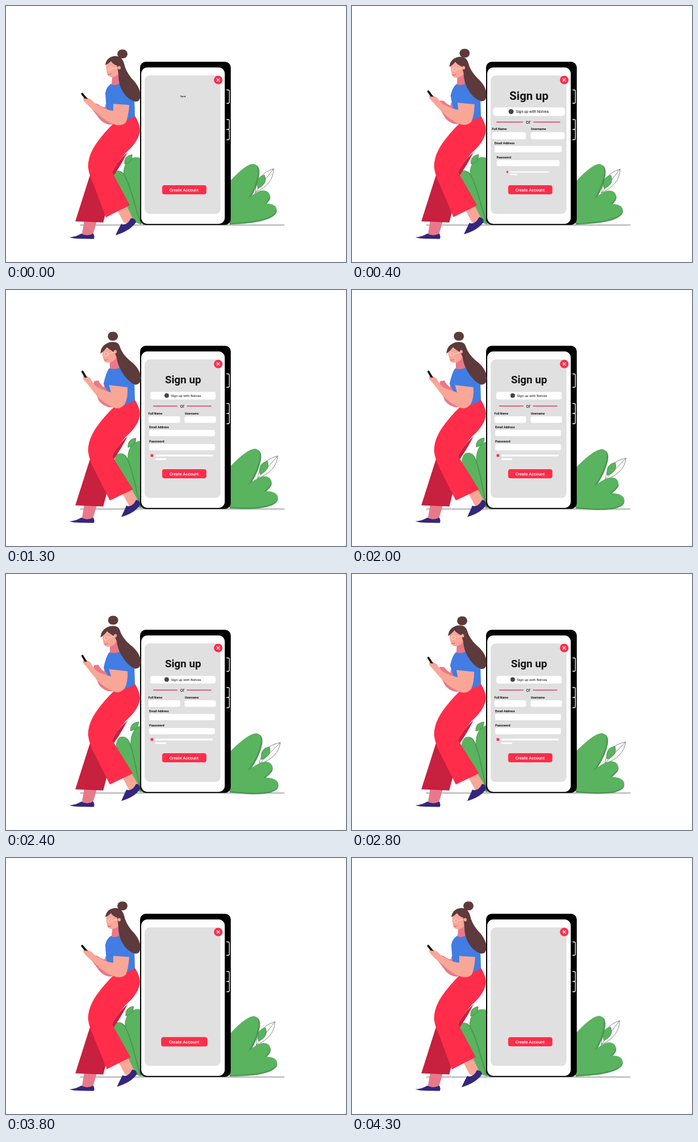
Animation of 596x450 px, one loop 4400 ms. Source, as an HTML page:

```html
<!DOCTYPE html>
<html lang="en">
<head>
<meta charset="utf-8">
<title>Sign up</title>
<style>
  html, body { margin: 0; width: 100%; height: 100%; overflow: hidden; background: #fff; }
  svg { display: block; width: 100vw; height: 100vh; }
  text { font-family: Roboto, sans-serif; fill: #111; }
  .label { font-size: 5.35px; font-weight: 700; }
  .red { fill: #ff2d4a; }
  .dark-red { fill: #c8203f; }
  .white { fill: #fff; }
  .skin { fill: #f9a697; }
  .skin-shade { fill: #e8798a; }
  .shoe { fill: #33267d; }
  .shirt { fill: #417de2; }
  .hair { fill: #5d3a3c; }
  .leaf { fill: #5ab35f; }
  .shade { fill: #4a9652; }
  .line { fill: none; stroke-linecap: round; stroke-linejoin: round; }
</style>
</head>
<body>
<svg viewBox="0 0 596 450">
  <defs>
    <path id="l1" d="M240 384 C222 360 205 320 206 290 C208 272 220 265 230 266 C245 268 250 300 250 330Z"/>
    <path id="l2" d="M238 384 C210 375 186 335 187 305 C188 288 198 286 206 294 C218 310 226 350 238 384Z"/>
    <path id="r1" d="M392 384 L392 313 C408 295 425 279 436 279 C444 280 446 290 443 302 C438 325 425 350 392 384Z"/>
    <path id="r2" d="M392 384 C405 360 430 332 448 327 C460 325 466 333 462 341 C450 360 420 376 392 384Z"/>
    <path id="r3" d="M392 384 C405 365 440 350 458 350 C472 350 478 358 473 365 C462 380 420 383 392 384Z"/>
  </defs>

  <!-- plants -->
  <path d="M130 385H488" stroke="#666"/>
  <g data-sway="8" data-c="238 384">
    <use href="#l1" class="shade"/><use href="#l1" class="leaf" x="1"/>
  </g>
  <g data-sway="5.4" data-c="238 384">
    <use href="#l2" class="shade"/><use href="#l2" class="leaf" x="-2"/>
    <path d="M208 278 Q206 264 221 261 Q222 275 208 278Z" class="leaf" stroke="#3d8a49" stroke-width=".8"/>
  </g>
  <g data-sway="7.3" data-c="394 384" stroke="#555" stroke-width=".7" class="line">
    <path d="M437 328 Q438 296 469 286 Q469 313 437 328 L469 286"/>
  </g>
  <g data-sway="3.3" data-c="394 384">
    <use href="#r1" class="shade"/><use href="#r1" class="leaf" x="-2.5" y="-1.5"/>
  </g>
  <g data-sway="6" data-c="394 384">
    <path d="M441.5 321 Q436 302 453 297 Q460 312 441.5 321Z" class="leaf" stroke="#3d8a49" stroke-width=".8"/>
  </g>
  <g data-sway="5.6" data-c="394 384">
    <use href="#r2" class="shade"/><use href="#r2" class="leaf" x="-1" y="-2.5"/>
  </g>
  <g data-sway="9.5" data-c="394 384">
    <use href="#r3" class="shade"/><use href="#r3" class="leaf" x="-.5" y="-2.5"/>
  </g>

  <!-- phone -->
  <rect x="235" y="98" width="159" height="286.8" rx="10"/>
  <rect x="237" y="108" width="146.5" height="275" rx="11" class="white"/>
  <rect x="243" y="122" width="133" height="243.6" rx="9" fill="#e0e0e0"/>
  <g class="line" stroke="#fff" stroke-width="1.3" transform="translate(.5)">
    <path d="M386.5 147.5H389Q391 147.5 391 149.5V169Q391 171 389 171H386.5"/>
    <path d="M386.5 199.5H389Q391 199.5 391 201.5V215Q391 217 389 217H386.5M389 217Q391 217 391 219V233Q391 235 389 235H386.5"/>
  </g>
  <circle cx="372" cy="130" r="7.6" class="red"/>
  <path d="M369.8 127.8l4.4 4.4m0 -4.4l-4.4 4.4" class="line" stroke="#fff" stroke-width="1.3"/>

  <!-- form -->
  <g data-in="-20" data-c="310.5 159">
    <text x="310.3" y="164.3" font-size="18.7" font-weight="700" text-anchor="middle">Sign up</text>
  </g>
  <g data-in="40" data-c="310 185.5">
    <rect x="253" y="179" width="114.5" height="13.5" rx="4" class="white"/>
    <circle cx="281.7" cy="185.6" r="4" fill="#444"/>
    <text x="289.3" y="187.7" font-size="6">Sign up with Nolvea</text>
  </g>
  <g data-in="80" data-c="309 204">
    <path d="M258 204H300.5M317 204H360" stroke="#e23a58" stroke-width="1.3"/>
    <text x="309" y="206.6" font-size="8.4" text-anchor="middle">or</text>
  </g>
  <g data-in="120" data-c="309 224">
    <text x="249.6" y="218.6" class="label">Full Name</text>
    <text x="313.4" y="218.6" class="label">Username</text>
    <rect x="249.7" y="222" width="55.5" height="11.5" rx="3" class="white"/>
    <rect x="313" y="222" width="55" height="11.5" rx="3" class="white"/>
  </g>
  <g data-in="165" data-c="308.5 248">
    <text x="251" y="243" class="label">Email Address</text>
    <rect x="251" y="246" width="115.3" height="11" rx="3" class="white"/>
  </g>
  <g data-in="200" data-c="308.5 273">
    <text x="251" y="267.8" class="label">Paassword</text>
    <rect x="251" y="270.8" width="115.3" height="11" rx="3" class="white"/>
  </g>
  <g data-in="285" data-c="308 293.5">
    <rect x="253.5" y="288.6" width="4.6" height="4.6" class="red"/>
    <rect x="262" y="289.6" width="100.6" height="2.8" rx="1" class="white"/>
    <rect x="262" y="296" width="19" height="2.8" rx="1" class="white"/>
  </g>
  <g id="button" data-c="312.5 323">
    <rect x="273.7" y="315" width="77.6" height="16" rx="4" class="red"/>
    <text x="312" y="325.5" font-size="7.35" font-weight="500" text-anchor="middle" style="fill:#fff">Create Account</text>
  </g>

  <!-- woman: "a~b" coordinates run from the upright pose to the leaning one -->
  <path d="M137 378 L159 379 L152 403 Q142 406 133 402Z" class="skin-shade"/>
  <path d="M111 406.5 Q124 405.5 132 400 Q142 406 153 400 Q156 405 154 409.5 L130 409 Q118 409 111 406.5Z" class="shoe"/>
  <path d="M147 298 L121.5 378.5 L170.5 380.5 L186 320 L175 296Z" class="dark-red"/>
  <path d="M184 296 Q192 276 213 257 Q202 279 188 299Z" class="dark-red"/>
  <g data-pose="foot">
    <path d="M196~205 361~359 L212~220 352~350 L223~232 375~371 Q216~225 386~382 206~216 380~380Z" class="skin"/>
    <path d="M192~202 403~399 Q198~208 390~386 202~211 383~379 Q212~221 387~383 219~228 373~369 Q227~235 373~369 228~235 380~378 Q218~226 395~392 192~202 403~399Z" class="shoe"/>
    <path d="M190 205 Q172 222 158 242 Q143 264 144 284 Q146 299 153 312 L175~182 371.5~370 L217~222.5 350~350.5 L186 292 Q192 279 210 258 Q233 238 235 218 Q234 206 226 193Z" class="red"/>
  </g>
  <g data-pose="body">
    <path d="M175~172 172~165 L188~184 182~180 L190~188 207~206 Q178~174 212~208 165~163 200~195 L147~152 176~168 L152~155 170~160 L160~162 172~159 Q168~166 178~167 173~172 178~171Z" class="skin-shade"/>
    <path d="M184~180.5 137~138 Q176~175 142~146 174~171 153~165 L176~178 180~178 L190 207 Q210 203 226 194 L225 160 Q218 138 201 134Z" class="shirt"/>
    <path d="M188~180.5 172~167 L216~213 174~171 Q215~214 193~190 210~208 205~201 Q203~201 211~209 193~193 209~208 Q176~176 205~203 158~160 187~187 Q146~148 177~172 141~141 172~163 L136~135 166~156 Q134~134 160~150 140~139 160~150 L150~148 165~155 Q158~154 174~167 164~160 176~171 Q176~172 183~177 188~184 184~180Z" class="skin"/>
    <path d="M133.5~134 154.5~143.5 L141~140.5 163.5~154.5" class="line" stroke="#111" stroke-width="3.6"/>
    <path d="M136~136 165~156 Q140~141 160~151 144~144 165~156 L142~143 170~161Z" class="skin"/>
    <path d="M187~182 118~121 L199~194 112~116 L201 135 Q193 141 185~182 138Z" class="skin-shade"/>
    <path d="M176~168 100~106 Q184~178 94~98 197~189 103~108 L199~194 114~117 Q197~189 124~128 186~178 125~128 Q178~171 125~126 177~171 118~122 Q175~168.5 108~113 176~168 100~106Z" class="skin"/>
    <path d="M174~165.5 104~112 Q176~166 90~97 190~181 88~92 Q203~196 87~89 207~199 101~98 Q209~203 113~112 220~217 127~124 Q236 143~138 235.5~236.5 158~156 Q235 169~167 226 168~166.5 Q212 164~160 204~202 149~142 Q197~195 138~130 197~194 120~118 L195~190 105~110 Q187~181 102~104 184~177 97~101 Q179~171 102~108 174~165.5 104~112Z" class="hair"/>
    <path d="M203~186.2 84.2~81.2 h2.2" class="line" stroke="#5d3a3c" stroke-width="15.6"/>
    <path d="M198.5~191.5 108~108 v1" class="line" stroke="#f9a697" stroke-width="5"/>
    <path d="M179~172 110~113 a3.4 3.4 0 1 0 6.8 0 a3.4 3.4 0 1 0 -6.8 0 m6.8 0 L197~190 108~109" class="line" stroke="#fde3de" stroke-width=".8"/>
    <path d="M179~173 120~123 q2.5 1.5 5 -.5" class="line" stroke="#e0405a" stroke-width="1"/>
  </g>
</svg>
<script>
  const LOOP = 4400, STEP = 100;
  const all = (selector) => [...document.querySelectorAll(selector)];
  const progress = (t, from, to) => Math.min(1, Math.max(0, (t - from) / (to - from)));
  const ease = (p) => (1 - Math.cos(Math.PI * p)) / 2;
  const backOut = (p) => 1 + 2.70158 * (p - 1) ** 3 + 1.70158 * (p - 1) ** 2;
  const thereAndBack = (t, inEnd, outStart, outEnd) =>
    ease(progress(t, 0, inEnd)) - ease(progress(t, outStart, outEnd));

  const swaying = all('[data-sway]');
  const popping = all('[data-in]');
  const button = document.getElementById('button');
  const posed = all('[data-pose] path').map((el) => ({
    el, shape: el.getAttribute('d'), part: el.parentNode.dataset.pose
  }));

  function scale(el, s) {
    const [x, y] = el.dataset.c.split(' ').map(Number);
    el.setAttribute('transform', `translate(${x} ${y}) scale(${s}) translate(${-x} ${-y})`);
  }

  const blend = (shape, k) =>
    shape.replace(/([\d.]+)~([\d.]+)/g, (_, a, b) => (+a + (b - a) * k).toFixed(2));

  function popScale(t, start) {
    const shown = backOut(progress(t, start, start + 600));
    const left = backOut(1 - progress(t, 2900 + start, 3400 + start));
    return Math.max(0, t < 2000 ? shown : left);
  }

  function draw(t) {
    const sway = thereAndBack(t, 2350, 2350, LOOP);
    const pose = {
      body: thereAndBack(t, 920, 2250, 3620),
      foot: thereAndBack(t, 900, 2800, 4300)
    };
    for (const el of swaying)
      el.setAttribute('transform', `rotate(${el.dataset.sway * sway} ${el.dataset.c})`);
    for (const { el, shape, part } of posed) el.setAttribute('d', blend(shape, pose[part]));
    for (const el of popping) scale(el, popScale(t, +el.dataset.in));
    scale(button, 1 + 0.052 * Math.sin(Math.PI * progress(t, 3600, 4200)));
  }

  const start = performance.now();
  function frame() {
    const t = (performance.now() - start) % LOOP;
    draw(Math.floor(t / STEP) * STEP);
    requestAnimationFrame(frame);
  }
  frame();
</script>
</body>
</html>
```
